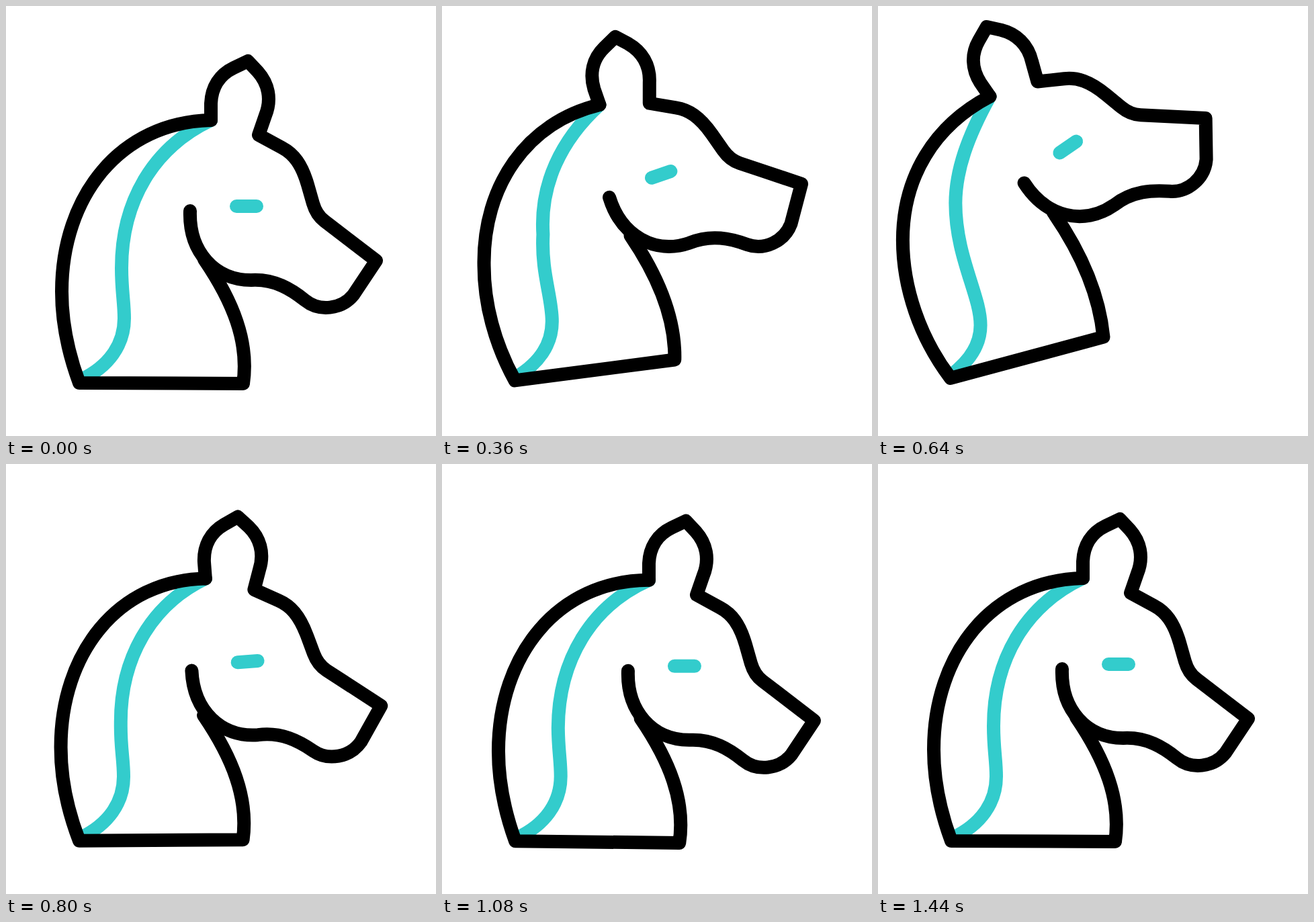
Recreate the animation shown at these times as an HTML page. Size 640 by 640 pixels, loop 1.48 s.

```html
<!DOCTYPE html>
<html>
<head>
<meta charset="utf-8">
<style>
  html, body { margin: 0; height: 100%; overflow: hidden; background: #fff; }
  svg { display: block; width: 100vw; height: 100vh; }
  path { fill: none; stroke: #000; stroke-width: 20; stroke-linecap: round; stroke-linejoin: round; }
  .teal { stroke: #3cc; }
</style>
</head>
<body>
<svg viewBox="0 0 640 640">
  <path id="mane" class="teal"/>
  <path id="neck"/>
  <g id="head">
    <path class="teal" d="M343 298H373"/>
    <path d="M274 305C272 365 310 408 365 408C400 406 425 422 445 438C466 455 499 452 517 430L551 379L474 320
             Q462 311 457 294L449 266C440 235 428 220 411 211L376 192L386 163C396 138 390 115 375 98L360 82
             L339 92C318 102 306 121 305 145L305 170"/>
  </g>
</svg>
<script>
const LOOP = 1480, STEP = 40, TILT = 35;
const EYE = [358, 298], EAR = [-53, -128];
const BASE = [[109, 561], [108, 554]];

// Swing keys [time, amount]: 0 is rest, 1 is fully leaned back
const neckKeys = [[0, 0], [98, 0], [625, 1.03], [930, -0.58], [1190, 0.31], [1440, 0], [LOOP, 0]];
const headKeys = [[0, 0], [80, 0], [615, 1.01], [930, -0.38], [1180, 0.2], [1440, 0], [LOOP, 0]];

// Neck and mane outlines at rest and leaned back
const neckShape = [
  "M295 377C338 440 362 500 353 562L109 561C92 515 83 470 83 425C83 283 170 173 ",
  "M262 309C309 377 331 440 336 494L108 554C63 494 38 420 38 350C38 255 85 178 "
];
const maneShape = [
  "C220 210 172 290 172 390C172 425 176 440 176 465C176 505 152 537 112 556",
  "C135 195 117 245 117 295C117 375 153 430 153 475C153 505 135 530 108 550"
];

const $ = id => document.getElementById(id);
const lerp = (a, b, s) => a + (b - a) * s;

function swing(keys, t) {
  const i = keys.findIndex(k => k[0] > t);
  const [t0, a] = keys[i - 1], [t1, b] = keys[i];
  return lerp(a, b, (1 - Math.cos(Math.PI * (t - t0) / (t1 - t0))) / 2);
}

// Blends two outlines by angle and distance around the base corner
function morph([from, to], s) {
  const pair = /(\d+) (\d+)/g;
  const targets = [...to.matchAll(pair)];
  const polar = (x, y, [bx, by]) => [Math.hypot(x - bx, y - by), Math.atan2(y - by, x - bx)];
  const [cx, cy] = BASE[0].map((v, k) => lerp(v, BASE[1][k], s));
  let i = 0;
  return from.replace(pair, (_, x, y) => {
    const [, tx, ty] = targets[i++];
    const [r0, a0] = polar(x, y, BASE[0]), [r1, a1] = polar(tx, ty, BASE[1]);
    const r = lerp(r0, r1, s), a = lerp(a0, a1, s);
    return `${(cx + r * Math.cos(a)).toFixed(2)} ${(cy + r * Math.sin(a)).toFixed(2)}`;
  });
}

function draw(now) {
  const t = Math.floor(now % LOOP / STEP) * STEP;
  const s = swing(neckKeys, t), h = swing(headKeys, t);
  const rad = TILT * Math.PI / 180, arc = 4 * s * (1 - s);

  // The head follows the neck on an arc and nods by its own amount
  const x = EYE[0] - 72 * s + 3.5 * arc + 75 * Math.sin((h - s) * rad);
  const y = EYE[1] - 86.5 * s - 3 * arc;
  const cos = Math.cos(h * rad), sin = Math.sin(-h * rad);
  const ear = [x + EAR[0] * cos - EAR[1] * sin, y + EAR[0] * sin + EAR[1] * cos].join(" ");

  $("head").setAttribute("transform",
    `translate(${x} ${y}) rotate(${-TILT * h}) translate(${-EYE[0]} ${-EYE[1]})`);
  $("neck").setAttribute("d", morph(neckShape, s) + ear);
  $("mane").setAttribute("d", "M" + ear + morph(maneShape, s));
}

const start = performance.now();
function tick() {
  draw(performance.now() - start);
  requestAnimationFrame(tick);
}
tick();
</script>
</body>
</html>
```
